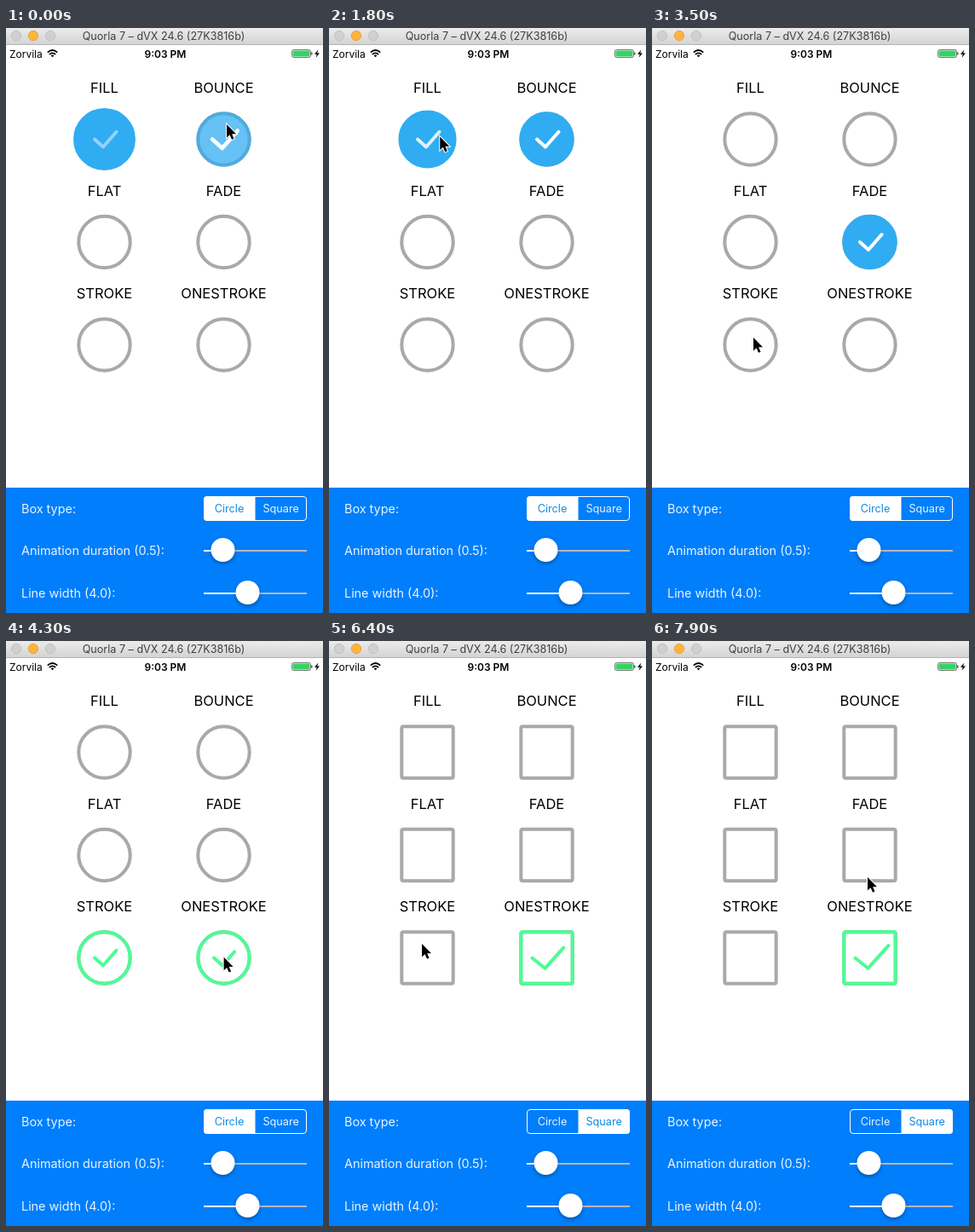
Write an HTML page that moves like this. It is 372 px wide and 686 px high and loops after 8000 ms.

```html
<!DOCTYPE html>
<html lang="en">
<head>
<meta charset="utf-8">
<title>Checkbox styles</title>
<style>
html, body { margin: 0; width: 100%; height: 100%; overflow: hidden; background: #fff; }
svg { display: block; width: 372px; height: 686px; font-family: Inter, "Liberation Sans", sans-serif; }
.mid { text-anchor: middle; }
.label { font-size: 16.5px; }
.row { font-size: 14.4px; fill: #eaf4ff; }
.seg { font-size: 12.7px; }
.mark { fill: none; stroke-width: 4; stroke-linecap: round; stroke-linejoin: round; }
.thumb { fill: #fff; filter: drop-shadow(0 2px 2px #0005); }
</style>
</head>
<body>
<svg viewBox="0 0 372 686">
  <defs>
    <linearGradient id="bar" x2="0" y2="1">
      <stop stop-color="#ececec"/><stop offset="1" stop-color="#d2d2d2"/>
    </linearGradient>
    <clipPath id="pill"><rect x="232" y="549" width="121" height="29" rx="4"/></clipPath>
  </defs>

  <rect width="372" height="20" fill="url(#bar)"/>
  <path d="M0 19.5H372" stroke="#b4b4b4"/>
  <g stroke="#bcbcbc" stroke-width=".8" fill="#d0d0d0">
    <circle cx="12" cy="9" r="5.7"/>
    <circle cx="32" cy="9" r="5.7" fill="#fdb43c" stroke="#e09b33"/>
    <circle cx="52" cy="9" r="5.7"/>
  </g>
  <text class="mid" x="185" y="14" font-size="12.6" fill="#404040">Quorla 7 – dVX 24.6 (27K3816b)</text>

  <text x="4" y="34.5" font-size="12">Zorvila</text>
  <g fill="none" stroke="#000" stroke-width="1.7">
    <path d="M48.8 28.6Q54.5 23.4 60.2 28.6M50.9 31Q54.5 27.7 58.1 31"/>
    <path d="M52.6 32.3Q54.5 30.8 56.4 32.3L54.5 34.3Z" fill="#000" stroke="none"/>
  </g>
  <text class="mid" x="187" y="34.5" font-size="12" font-weight="600">9:03 PM</text>
  <rect x="335.5" y="25.5" width="22" height="9" rx="2" fill="#fff" stroke="#555" stroke-width=".8"/>
  <rect x="336.5" y="26.5" width="20" height="7" rx="1" fill="#35d264"/>
  <path d="M358.8 28.5V31.5" stroke="#555" stroke-width="1.4"/>
  <path d="M366.3 25.5L362 30.7H364.8L363.6 34.8L368 29.4H365.2Z"/>

  <g id="boxes"></g>

  <rect y="539" width="372" height="147" fill="#007efb"/>
  <text class="row" x="18" y="568.5">Box type:</text>
  <text class="row" x="18" y="617.5">Animation duration (0.5):</text>
  <text class="row" x="18" y="667.5">Line width (4.0):</text>
  <rect id="pick" y="549" width="60.5" height="29" fill="#fff" clip-path="url(#pill)"/>
  <rect x="232.5" y="549.5" width="120" height="28" rx="3.5" fill="none" stroke="#fff"/>
  <text class="seg mid" x="262" y="568">Circle</text>
  <text class="seg mid" x="322.7" y="568">Square</text>
  <g stroke-width="2">
    <path d="M232 613H353M232 663H353" stroke="#b5b9c0"/>
    <path d="M232 613H254M232 663H283" stroke="#fff"/>
  </g>
  <circle class="thumb" cx="254.5" cy="612" r="14"/>
  <circle class="thumb" cx="283.5" cy="662" r="14"/>

  <path id="cursor" d="M0 0V15.6L3.6 12.3L6 17.8L8.5 16.7L6.1 11.3H11Z" stroke="#fff" stroke-width="2" paint-order="stroke"/>
</svg>
<script>
const LOOP = 8000, SPAN = 250, SQUARE_AT = 5560;
const BLUE = '#30acf2', GREEN = '#4dfc95', HALF = 30.2;
const ROUND_MARK = [[-11.5, 0], [-1.5, 9], [14, -8.7]];
const SQUARE_MARK = [[-17, .3], [-2, 12.3], [22, -14.3]];

// Every box starts unchecked and flips at each listed time.
const STYLES = [
  ['FILL', [-900, -129, 1027, 1760]],
  ['BOUNCE', [-900, -65, 937, 1950]],
  ['FLAT', [2130, 2980]],
  ['FADE', [2420, 3800]],
  ['STROKE', [3510, 4700, 6430, 7651]],
  ['ONESTROKE', [4060, 5850, 6160, 6900, 7440]]
];

// Pointer stops: time, x, y
const STOPS = [
  [0, 259, 113], [350, 205, 138], [700, 256, 125], [940, 256, 125],
  [1030, 127, 125], [1200, 127, 125], [1600, 118, 128], [1770, 118, 128],
  [1940, 258, 122], [2130, 115, 245], [2390, 247, 256], [2600, 250, 254],
  [2760, 250, 254], [2980, 112, 250], [3200, 118, 262], [3480, 119, 363],
  [3540, 119, 363], [3790, 250, 250], [4060, 258, 366], [4400, 255, 372],
  [4690, 118, 366], [4850, 120, 368], [5190, 321, 561], [5400, 322, 562],
  [5580, 322, 562], [5840, 262, 365], [6170, 260, 364], [6390, 109, 355],
  [6440, 109, 355], [6650, 190, 267], [6900, 256, 362], [7300, 258, 366],
  [7450, 258, 366], [7640, 118, 366], [7890, 253, 277], [8000, 253, 276]
];

const byId = id => document.getElementById(id);
const clamp = v => Math.max(0, Math.min(1, v));
const mix = (a, b, k) => a + (b - a) * k;
const smooth = k => k * k * (3 - 2 * k);
const set = (node, attrs) => {
  for (const key in attrs) node.setAttribute(key, attrs[key]);
  return node;
};
const add = (parent, tag, attrs) =>
  set(parent.appendChild(document.createElementNS('http://www.w3.org/2000/svg', tag)), attrs);

const boxes = STYLES.map(([name, flips], i) => {
  const x = 115.5 + i % 2 * 140, y = 130.5 + (i >> 1) * 120.5;
  const holder = byId('boxes');
  add(holder, 'text', { class: 'label mid', x, y: y - 54.5 }).textContent = name;
  const g = add(holder, 'g', { transform: `translate(${x} ${y})` });
  const lined = i > 3;
  return {
    name, flips, lined,
    base: add(g, 'path', { class: 'mark', stroke: '#a9a9a9' }),
    top: add(g, 'path', { class: 'mark', stroke: lined ? GREEN : BLUE, pathLength: 1 }),
    mark: add(g, 'path', { class: 'mark', stroke: lined ? GREEN : '#fff', pathLength: 1 })
  };
});

function outline(r) {
  const s = HALF - r, a = `A${r} ${r} 0 0 1`;
  return `M${HALF} ${-s}V${s}${a} ${s} ${HALF}H${-s}${a} ${-HALF} ${s}` +
    `V${-s}${a} ${-s} ${-HALF}H${s}${a} ${HALF} ${-s}Z`;
}

// How far a box is checked, 0 to 1.
function level(flips, t) {
  const past = flips.filter(f => f <= t);
  if (!past.length) return 0;
  const u = clamp((t - past[past.length - 1]) / SPAN);
  return past.length % 2 ? u : 1 - u;
}

// Grows past full size at the halfway point, then settles.
const bounce = (v, extra) => v < .5 ? 2 * v * (1 + extra) : 1 + extra * 2 * (1 - v);

function drawTo(node, k) {
  set(node, { 'stroke-dasharray': `${k} 2`, opacity: k > 0 ? 1 : 0 });
}

function drawBox(box, t, square) {
  const v = level(box.flips, t), path = outline(mix(HALF, 2, square));
  const flat = box.name === 'FLAT' ? v : 1;
  const points = ROUND_MARK.map(([x, y], i) =>
    [mix(x, SQUARE_MARK[i][0], square), mix(y, SQUARE_MARK[i][1], square) * flat]);
  set(box.base, { d: path });
  set(box.top, { d: path });
  set(box.mark, { d: 'M' + points.join('L') });
  if (box.lined) {
    const single = box.name === 'ONESTROKE';
    drawTo(box.top, single ? clamp(v / .6) : v);
    drawTo(box.mark, single ? clamp((v - .4) / .6) : v);
    return;
  }
  const fill = box.name === 'FILL', pop = box.name === 'BOUNCE';
  set(box.top, {
    style: `fill:${BLUE}`,
    opacity: fill ? +(v > 0) : v,
    transform: `scale(${fill ? bounce(v, .18) : 1})`
  });
  set(box.mark, {
    opacity: pop ? +(v > 0) : v,
    transform: `scale(${pop ? bounce(v, .3) : 1})`
  });
}

function pointer(t) {
  const i = STOPS.findIndex(s => s[0] > t);
  const [t0, x0, y0] = STOPS[i - 1], [t1, x1, y1] = STOPS[i];
  const k = smooth((t - t0) / (t1 - t0));
  return `translate(${mix(x0, x1, k)} ${mix(y0, y1, k)})`;
}

const segments = document.querySelectorAll('.seg');

function frame() {
  const t = performance.now() % LOOP;
  const square = smooth(clamp((t - SQUARE_AT) / SPAN));
  const picked = +(t >= SQUARE_AT);
  boxes.forEach(box => drawBox(box, t, square));
  set(byId('pick'), { x: 232 + picked * 60.5 });
  segments.forEach((s, i) => set(s, { fill: i === picked ? '#0b8ce0' : '#eaf4ff' }));
  set(byId('cursor'), { transform: pointer(t) });
  requestAnimationFrame(frame);
}
frame();
</script>
</body>
</html>
```
